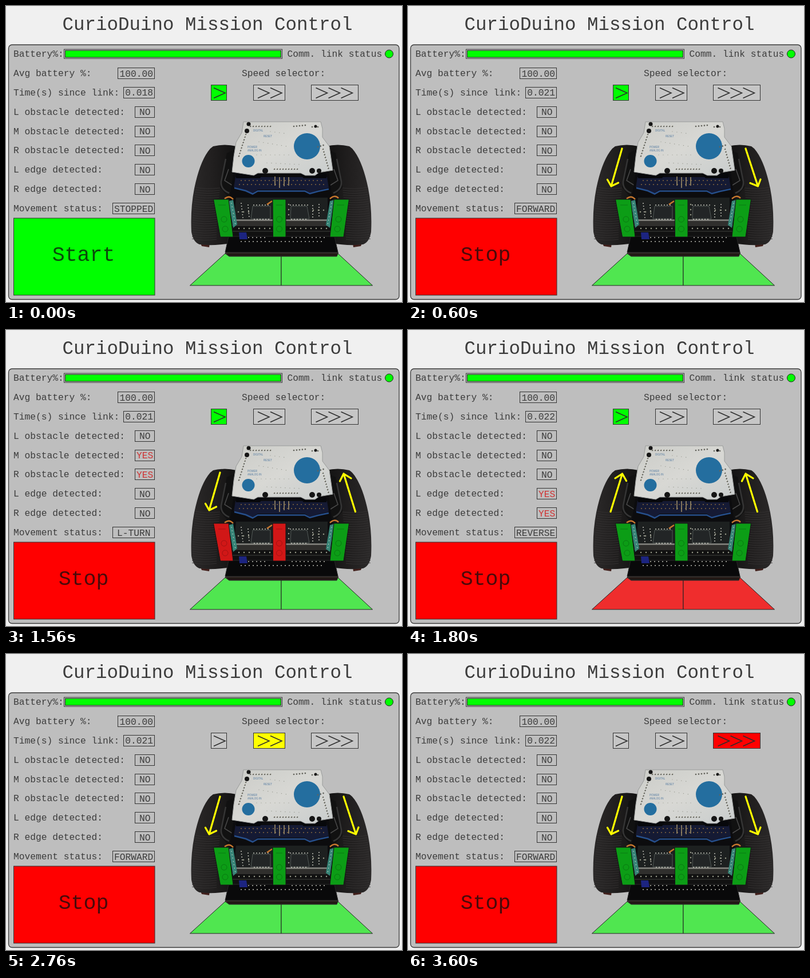
Animation of 692 by 519 pixels, one loop 4.2 s. Source, as an HTML page:

```html
<!DOCTYPE html>
<html lang="en">
<head>
<meta charset="utf-8">
<title>Mission Control</title>
<style>
html, body { margin: 0; width: 100%; height: 100%; overflow: hidden; background: #f0f0f0; }
svg { display: block; width: 692px; height: 519px; }
text { font: 16.25px "Courier New", "Liberation Mono", monospace; fill: #3c3c3c; white-space: pre; }
.mid { text-anchor: middle; }
.box { fill: none; stroke: #333; stroke-width: 1; }
.chev { fill: none; stroke: #2c2c2c; stroke-width: 1.5; }
.arrow { fill: none; stroke: #ffff00; stroke-width: 3.2; stroke-linecap: round; stroke-linejoin: round; }
.pins { fill: none; stroke-linecap: round; }
.tiny { font: 4.5px "Liberation Sans", sans-serif; fill: #5279a0; }
</style>
</head>
<body>
<svg viewBox="0 0 692 519" xmlns="http://www.w3.org/2000/svg">
  <defs>
    <linearGradient id="tread" x1="0" x2="1">
      <stop offset="0" stop-color="#2b2929"/><stop offset=".5" stop-color="#201e1e"/><stop offset="1" stop-color="#111"/>
    </linearGradient>
    <linearGradient id="pcb" x1="0" y1="0" x2="1" y2="1">
      <stop offset="0" stop-color="#cbccc8"/><stop offset=".5" stop-color="#d8d8d4"/><stop offset="1" stop-color="#c9cdcd"/>
    </linearGradient>
    <g id="track">
      <path fill="#42201c" d="M340 416H356L355 423L342 421Z"/>
      <path fill="url(#tread)" d="M362 246Q382 241 403 246L404 300L396 340L394 416Q362 421 338 418Q327 414 324 396Q322 356 329 320Q338 276 353 255Q357 249 362 246Z"/>
      <path fill="#111" d="M386 258L404 250V335L391 338L374 318Z"/>
      <path fill="none" stroke="#353535" stroke-width="2.500" d="M384 268L376 308Q375 322 390 328"/>
      <path fill="none" stroke="#4a4a4a" stroke-width="1.500" d="M389 286L382 306L398 316"/>
      <g id="ribs"></g>
    </g>
  </defs>

  <rect width="692" height="519" fill="#f0f0f0"/>
  <text x="352" y="42" class="mid" style="font-size:32.5px">CurioDuino Mission Control</text>
  <rect x="4.500" y="68" width="682.500" height="446.500" rx="6" fill="#bebebe" stroke="#3a3a3a" stroke-width="1.300"/>

  <text x="13" y="89">Battery%:</text>
  <rect class="box" x="101.500" y="76" width="381" height="16" style="fill:#d0d0d0"/>
  <rect x="103.500" y="78" width="377" height="12" fill="#00ff00" stroke="#222"/>
  <text x="491.500" y="89">Comm. link status</text>
  <circle cx="669.500" cy="84" r="7" fill="#00ff00" stroke="#222"/>
  <text x="412" y="123">Speed selector:</text>
  <g id="panel"></g>
  <rect id="button" class="box" x="13.500" y="372" width="246.500" height="135"/>
  <text id="action" class="mid" x="135.500" y="447" style="font-size:36.56px"></text>

  <!-- robot -->
  <use href="#track"/>
  <use href="#track" transform="matrix(-1 0 0 1 962 0)"/>
  <path fill="#0c0c0e" d="M398 290H564L570 336L575 412L581 434L580 439H390L383 434L388 410L391 336Z"/>
  <path fill="#151a34" d="M401 300H561L564 319L545 323L531 328L522 322H440L431 328L398 318Z"/>
  <path fill="none" stroke="#264f8c" stroke-width="2.500" d="M399 319L419 324L431 329.500L440 324.500H522L531 329L545 325L564 321"/>
  <path class="pins" stroke="#94713f" stroke-width="1.800" stroke-dasharray="0 7" d="M411 306H554M408 313H558"/>
  <path fill="#07080b" d="M402 292H450L444 302H402ZM512 293H560V302H520Z"/>
  <path stroke="#a5946b" stroke-width="1.500" d="M470 299V315M478 300V319M486 300V316M494 300V315"/>

  <path fill="url(#pcb)" stroke="#999b9a" stroke-width="1" d="M415 203H550L553 215V230L565 246L571 288L547 292L540 297H523L515 293H440L433 297L395 291L398 264L402 239L412 222Z"/>
  <circle cx="526" cy="246" r="23" fill="#246e9f"/>
  <circle cx="423.500" cy="272" r="11" fill="#246e9f"/>
  <path class="pins" stroke="#62625b" stroke-width="2.700" stroke-dasharray="0 5" d="M419 225L406 266M427 211H467M503 211L524 209M545 247L558 243M554 251L564 287M469 286H510M535 212H548"/>
  <path class="pins" stroke="#f2eedc" stroke-width="1.300" stroke-dasharray="0 5" d="M418 224L405 265M426 210H466M553 250L563 286M468 285H509"/>
  <path class="pins" stroke="#86887d" stroke-width="1.200" stroke-dasharray="0 8" d="M442 238L490 246M438 261H495M456 275L515 278M462 220L492 224"/>
  <g fill="#151515"><circle cx="424" cy="207" r="3.500"/><circle cx="421" cy="219" r="4"/><circle cx="453" cy="289" r="5"/><circle cx="535" cy="289" r="5"/><circle cx="547" cy="289" r="4"/><circle cx="541" cy="211" r="2.500"/></g>
  <g><text class="tiny" x="432" y="220">DIGITAL</text><text class="tiny" x="422" y="249">POWER</text><text class="tiny" x="422" y="255">ANALOG IN</text><text class="tiny" x="450" y="230">RESET</text></g>

  <path fill="#1d2020" d="M402 336H562V376H398Z"/>
  <path fill="#111" d="M392 376H570L575 408H388Z"/>
  <path fill="#302f2d" d="M397 376H566L568 386H395Z"/>
  <path stroke="#868681" stroke-width="2.500" d="M397 375.500H566"/>
  <path stroke="#41423f" stroke-width="1" d="M394 395H570"/>
  <g fill="#222526" stroke="#67706c" stroke-width=".7"><path d="M431 351H462V373H428ZM498 351H526L530 373H497Z"/></g>
  <path class="pins" stroke="#d2d2c8" stroke-width="1.800" stroke-dasharray="0 5" d="M411 346L414 371M423 349L425 371M433 349H461M497 349H531M536 350V372M547 348V369M434 374H462M499 374H529"/>
  <path class="pins" stroke="#959887" stroke-width="2.500" stroke-dasharray="0 9" d="M406 361H428M494 366V342M537 358H558M407 390H565"/>
  <path fill="#09090a" stroke="#282828" d="M389 404H574L580 432H383Z"/>
  <path class="pins" stroke="#bfbfb6" stroke-width="2" stroke-dasharray="0 7" d="M424 406H457M500 406H560M411 413H558"/>
  <path fill="#1c2480" d="M407 397H420L422 409H408Z"/>
  <path fill="#211815" stroke="#4b413c" d="M384 433H580L579 439H389Z"/>
  <path fill="#378477" d="M389 342L397 340L404 383L397 389ZM566 342L573 340L566 389L559 384Z"/>
  <path class="pins" stroke="#dbe0d3" stroke-width="1.500" stroke-dasharray="0 6" d="M394 346L401 384M569 346L562 384"/>
  <path fill="none" stroke="#c9782e" stroke-width="2.500" d="M382 338Q390 331 397 339M456 348L465 342M566 338Q575 330 581 337"/>

  <g stroke="#151515" stroke-width="1">
    <path id="sensor0" d="M362.500 339H389L397 405H374.500Z"/>
    <path id="sensor1" d="M466 339H489V405H466.500Z"/>
    <path id="sensor2" d="M573 339H599.500L590 405H566Z"/>
  </g>
  <g fill="none" stroke="#000" stroke-opacity=".22">
    <circle cx="381" cy="374" r="5"/><circle cx="383" cy="391" r="5"/>
    <circle cx="477.500" cy="374" r="5"/><circle cx="477.500" cy="391" r="5"/>
    <circle cx="581" cy="374" r="5"/><circle cx="579" cy="391" r="5"/>
    <path d="M371 349H384M472 349H483M578 349H591"/>
  </g>
  <g stroke="#222" stroke-width="1">
    <path id="edgeR" d="M383 434L390 439H481V490H321.500Z"/>
    <path id="edgeL" d="M580 434L578 439H481V490H640.500Z"/>
  </g>
  <path id="arrowL" class="arrow"/>
  <path id="arrowR" class="arrow"/>
</svg>
<script>
const STEP = 600;
const GREEN = '#00ff00', RED = '#ff0000', YELLOW = '#ffff00';
const $ = id => document.getElementById(id);

function add(parent, tag, attrs, content = '') {
  const el = document.createElementNS('http://www.w3.org/2000/svg', tag);
  for (const key in attrs) el.setAttribute(key, attrs[key]);
  el.textContent = content;
  parent.appendChild(el);
  return el;
}

// label, left edge of its value box
const rows = [
  ['Avg battery %:', 195.5], ['Time(s) since link:', 205.5],
  ['L obstacle detected:', 225.5], ['M obstacle detected:', 225.5],
  ['R obstacle detected:', 225.5], ['L edge detected:', 225.5],
  ['R edge detected:', 225.5], ['Movement status:', 186.5]
];
const fields = rows.map(([label, x], i) => {
  const y = 123 + i * 33.85, panel = $('panel');
  add(panel, 'text', { x: 13, y }, label);
  add(panel, 'rect', { class: 'box', x, y: Math.round(y - 15) + .5, width: 259.5 - x, height: 19 });
  return add(panel, 'text', { class: 'mid', x: (x + 260) / 2, y: y + .6 });
});

const speedColors = [GREEN, YELLOW, RED];
const speeds = [[358.5, 27, 363], [432.5, 55, 440], [533.5, 82, 541.5]].map(([x, width, tip], i) => {
  const box = add($('panel'), 'rect', { class: 'box', x, y: 138.5, width, height: 27 });
  for (let k = 0; k <= i; k++)
    add($('panel'), 'path', { class: 'chev', d: `M${tip + k * 22} 143.5l20 9l-20 9` });
  return box;
});

for (let i = 0; i < 23; i++) {
  const y = 318 + i * 4.1, left = 331 - 6 * Math.sin(i / 22 * Math.PI / 2);
  add($('ribs'), 'path', { d: `M${left} ${y}Q${left + 20} ${y + 4} ${left + 43} ${y + 1}`,
    fill: 'none', stroke: '#363434', 'stroke-width': .8 });
}

// obstacles and edges list the sides that are triggered
const states = [
  { link: '0.018', move: 'STOPPED', speed: 0 },
  { link: '0.021', move: 'FORWARD', speed: 0 },
  { link: '0.021', move: 'L-TURN', speed: 0, obstacles: 'MR' },
  { link: '0.022', move: 'REVERSE', speed: 0, edges: 'LR' },
  { link: '0.021', move: 'FORWARD', speed: 1 },
  { link: '0.020', move: 'R-TURN', speed: 1, obstacles: 'L' },
  { link: '0.022', move: 'FORWARD', speed: 2 }
];
const DOWN = 1, UP = -1;
const wheels = {
  STOPPED: [0, 0], FORWARD: [DOWN, DOWN], REVERSE: [UP, UP],
  'L-TURN': [DOWN, UP], 'R-TURN': [UP, DOWN]
};
const arrows = {
  L: { [DOWN]: 'M374 250L355 316M348.500 304.500L355 316L367.500 310', [UP]: 'M354 318.500L374.500 252M362 260L374.500 252L381.500 264.500' },
  R: { [DOWN]: 'M590 250L611.500 316M598 310.500L611.500 316L616 304', [UP]: 'M610.500 318.500L590 252M583.500 265L590 252L603 260' }
};

function show({ link, move, speed, obstacles = '', edges = '' }) {
  const hits = [...'LMR'].map(side => obstacles.includes(side));
  const drops = [...'LR'].map(side => edges.includes(side));
  const flags = [...hits, ...drops].map(on => on ? 'YES' : 'NO');
  ['100.00', link, ...flags, move].forEach((value, i) => {
    fields[i].textContent = value;
    fields[i].style.fill = value === 'YES' ? '#d03434' : '#3c3c3c';
  });
  speeds.forEach((box, i) => box.style.fill = i === speed ? speedColors[i] : '#c6c6c6');

  const idle = move === 'STOPPED';
  $('button').style.fill = idle ? GREEN : RED;
  $('action').textContent = idle ? 'Start' : 'Stop';
  $('action').style.fill = idle ? '#0a4a0a' : '#4a0a0a';

  // the robot faces the viewer, so its right is on the left
  hits.forEach((on, i) => $('sensor' + (2 - i)).setAttribute('fill', on ? '#d11717' : '#0c9d16'));
  $('edgeL').setAttribute('fill', drops[0] ? '#ef2d2d' : '#50e650');
  $('edgeR').setAttribute('fill', drops[1] ? '#ef2d2d' : '#50e650');
  [...'LR'].forEach((side, i) => $('arrow' + side).setAttribute('d', arrows[side][wheels[move][i]] || ''));
}

const start = performance.now();
let current = -1;
function tick() {
  const index = Math.floor((performance.now() - start) / STEP) % states.length;
  if (index !== current) show(states[current = index]);
  requestAnimationFrame(tick);
}
tick();
</script>
</body>
</html>
```
